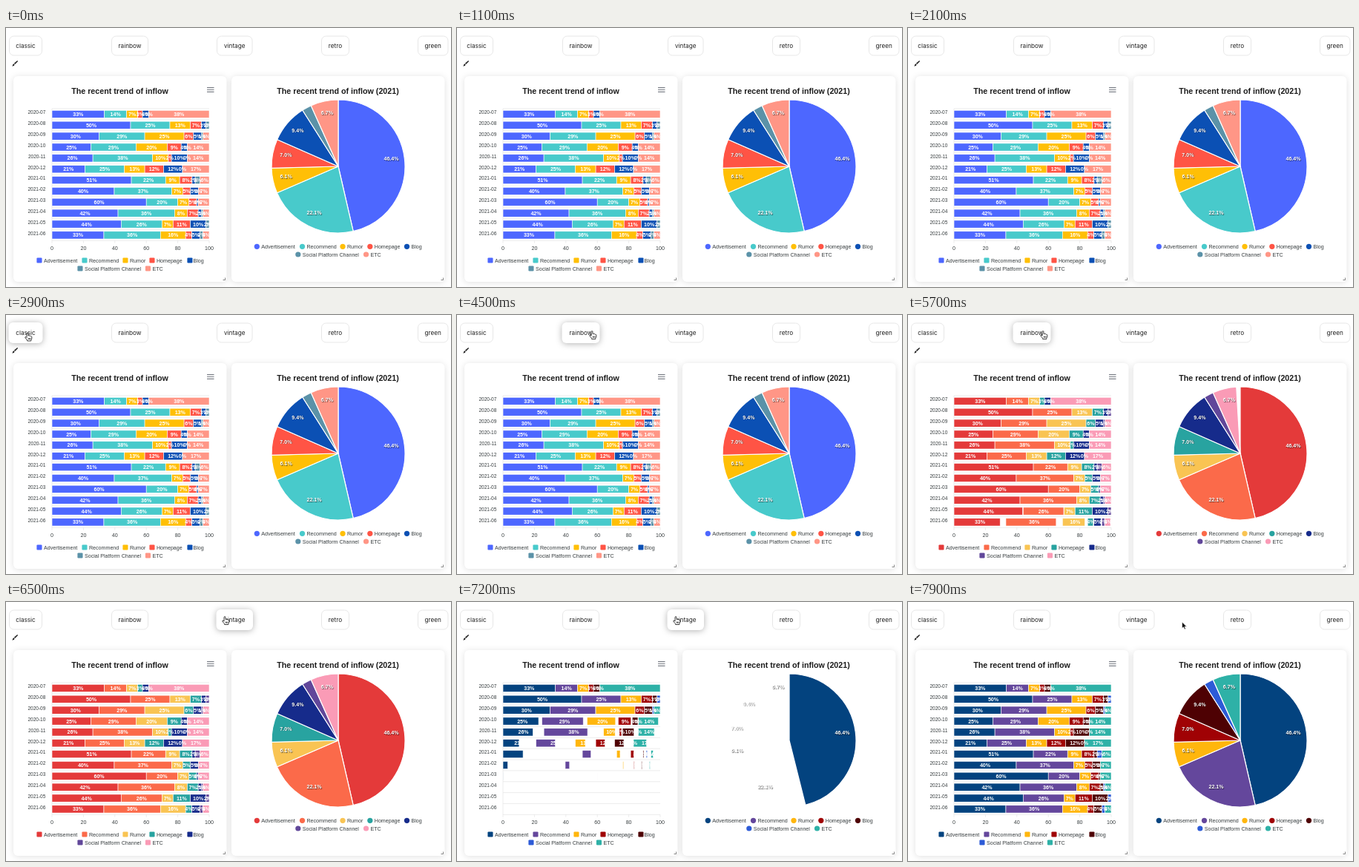
Write an HTML page that moves like this. It is 600 px wide and 350 px high and loops after 8 s.

```html
<!DOCTYPE html>
<html lang="en">
<head>
<meta charset="utf-8">
<title>Chart themes</title>
<style>
html, body { margin: 0; width: 600px; height: 350px; overflow: hidden; background: #fff; }
svg { display: block; font-family: "Liberation Sans", Arial, sans-serif; }
.title { font: bold 10.7px "Liberation Sans", Arial, sans-serif; fill: #1c1c1c; text-anchor: middle; }
.btn { font: 8.2px Inter, sans-serif; fill: #222; text-anchor: middle; }
.tick { font-size: 7.1px; fill: #373d3f; text-anchor: middle; }
.month { font-size: 6.5px; fill: #373d3f; text-anchor: end; }
.legend { font-size: 7.1px; fill: #373d3f; }
.value { font-size: 7.1px; font-weight: bold; fill: #fff; text-anchor: middle; }
.shade { text-shadow: .7px .7px .8px rgba(0, 0, 0, .6); }
.card { fill: #fff; filter: drop-shadow(0 1px 4px rgba(0, 0, 0, .12)); }
.lift { fill: #fff; filter: drop-shadow(0 1px 4px rgba(0, 0, 0, .3)); }
</style>
</head>
<body>
<svg id="stage" width="600" height="350" viewBox="0 0 600 350"></svg>
<script>
const LOOP = 8000;
const themes = [
  ['#4d67ff', '#48cacb', '#ffbf06', '#ff5445', '#0b50b4', '#5b92a8', '#ff9686'],
  ['#e43a3a', '#fb6a4a', '#f9c453', '#28a3a0', '#162b8b', '#61479a', '#fa9bb6'],
  ['#03437f', '#64479c', '#ffb60d', '#a00204', '#4e0103', '#2d5bd7', '#2eb1a7']
];
const names = ['Advertisement', 'Recommend', 'Rumor', 'Homepage', 'Blog', 'Social Platform Channel', 'ETC'];
const shares = [
  [33, 14, 7, 3, 4, 0, 38], [50, 25, 13, 7, 3, 2, 0], [30, 29, 25, 6, 5, 1, 4],
  [25, 29, 20, 9, 4, 0, 14], [26, 38, 10, 2, 10, 0, 14], [21, 25, 13, 12, 12, 0, 17],
  [51, 22, 9, 8, 2, 3, 6], [40, 37, 7, 5, 5, 0, 7], [60, 20, 7, 5, 1, 0, 7],
  [42, 36, 8, 7, 2, 1, 4], [44, 26, 7, 11, 10, 2, 0], [33, 36, 16, 4, 5, 2, 4]
];
const pieShares = [46.4, 22.1, 6.1, 7, 9.4, 2.3, 6.7];

// Theme clicks: bars restart first, the pie a moment later
const clicks = [{ theme: 1, at: 4815 }, { theme: 2, at: 6750 }];
const PIE_LAG = 99, BAR_TIME = 350, BAR_STEP = 55.6, PIE_TIME = 800;

// label, left, right, hover start, hover end
const buttons = [
  ['classic', 4.5, 48.5, 2400, 3835], ['rainbow', 142.5, 191.5, 4015, 5900],
  ['vintage', 284.5, 332, 6096, 7580], ['retro', 425.5, 462.5], ['green', 555.5, 596]
];
// time, x, y of the pointer tip
const path = [[2400, 29, 24], [3750, 29, 24], [4150, 182, 21.5], [5850, 182, 21.5],
  [6150, 295, 19.5], [7350, 295, 19.5], [7800, 369.5, 27]];

const stage = document.getElementById('stage');
function add(tag, attrs, text) {
  const el = document.createElementNS('http://www.w3.org/2000/svg', tag);
  set(el, attrs);
  if (text !== undefined) el.textContent = text;
  return stage.appendChild(el);
}
function set(el, attrs) {
  for (const k in attrs) el.setAttribute(k, attrs[k]);
}
const label = (cls, x, y, text) => add('text', { class: cls, x, y }, text);
const line = (d, stroke, width) => add('path', { d, stroke, 'stroke-width': width, fill: 'none' });
const clamp = v => Math.max(0, Math.min(1, v));
const ease = v => .5 - Math.cos(Math.PI * clamp(v)) / 2;

const lifts = buttons.map(([name, l, r]) => {
  const box = { y: 11, x: l, width: r - l, height: 26, rx: 6 };
  add('rect', { ...box, fill: '#fff', stroke: '#e1e1e1', 'stroke-width': .8 });
  const lift = add('rect', { ...box, class: 'lift', x: l - 1, y: 10, width: r - l + 2, height: 28 });
  label('btn', (l + r) / 2, 27, name);
  return lift;
});
add('path', { d: 'M8.4 51.8L9.2 49.4L10.4 48.3L11.7 49.6L10.7 50.9ZM10.9 47.8L15.2 44.1L16.1 45L12.2 49.1Z', fill: '#222' });

for (const x of [10, 304]) {
  add('rect', { class: 'card', x, y: 65, width: 287.5, height: 278, rx: 6 });
  line(`M${x + 282.5} 340.5h3v-3`, '#777', .9);
}
label('title', 153.5, 88.6, 'The recent trend of inflow');
label('title', 447.5, 88.6, 'The recent trend of inflow (2021)');
line('M271 80.6h9.5M271 83.5h9.5M271 86.4h9.5', '#7c8088', 1.1);

// Bar chart
const X0 = 62, WIDTH = 212, Y0 = 109, ROW = 14.86;
for (let i = 0; i <= 12; i++) line(`M${X0} ${Y0 + i * ROW}h${WIDTH}`, '#e0e0e0', .6);
line(`M${X0} ${Y0}v${12 * ROW}`, '#e0e0e0', .6);
for (let i = 0; i <= 5; i++) {
  const x = X0 + WIDTH * i / 5;
  line(`M${x} ${Y0 + 12 * ROW}v3.5`, '#e0e0e0', .6);
  label('tick', x, 300, i * 20);
}
const bars = [], values = [];
shares.forEach((row, j) => {
  const y = Y0 + j * ROW, total = row.reduce((a, b) => a + b);
  const month = (j + 6) % 12 + 1;
  label('month', 53.3, y + 7.2, `${j < 6 ? 2020 : 2021}-${String(month).padStart(2, '0')}`);
  let x = X0;
  row.forEach((v, s) => {
    const w = v / total * WIDTH;
    const el = add('rect', { x, y: y + 2.3, height: 10.3, stroke: '#fff', 'stroke-width': .6 });
    bars.push({ el, w, j, s });
    values.push([x + w / 2, y + 10, v + '%']);
    x += w;
  });
});
values.forEach(v => label('value', ...v));

// Pie chart
const CX = 448, CY = 187, R = 90;
const polar = (p, r) => {
  const a = p / 100 * 2 * Math.PI;
  return [CX + r * Math.sin(a), CY - r * Math.cos(a)];
};
let sum = 0;
const slices = pieShares.map(v => {
  const el = add('path', { stroke: '#fff', 'stroke-width': 1.2 });
  const from = sum;
  sum += v;
  return { el, from, v };
});
slices.forEach(({ from, v }) => {
  if (v < 3) return;
  const [x, y] = polar(from + v / 2, R * .8);
  label('value shade', x, y + .6, v.toFixed(1) + '%');
});

// Legends
const barKeys = [45, 106, 161, 197, 248, 100, 191.5].map((x, s) => {
  const y = s < 5 ? 314 : 325;
  label('legend', x + (s === 4 ? 4.5 : 6), y + 2.6, names[s]);
  return add('rect', { x: x - 3.6, y: y - 3.6, width: 7.1, height: 7.1, rx: 1.2 });
});
const pieKeys = [338.3, 399.5, 454, 490.8, 540.5, 393.8, 485.5].map((x, s) => {
  const y = s < 5 ? 295.3 : 306;
  label('legend', x + 6, y + 2.6, names[s]);
  return add('circle', { cx: x, cy: y, r: 3.6 });
});

// Pointer
const arrow = add('path', {
  d: 'M0 0V8.6L2 6.8L3.4 10L4.9 9.3L3.5 6.3H6.2Z',
  fill: '#111', stroke: '#fff', 'stroke-width': .6
});
const hand = add('path', {
  d: 'M-1 .8Q0-.6 1 .8V4Q2 3.2 2.8 4.2Q3.8 3.6 4.4 4.8Q5.6 4.4 5.8 5.8V7.6Q5.6 9 4.8 9.8V11H-.4V10L-3.2 6.6Q-3.4 5.2-2 5.6L-1 6.6ZM1.2 7.2V9.2M2.6 7.2V9.2M4 7.2V9.2',
  fill: '#fff', stroke: '#111', 'stroke-width': .8, 'stroke-linejoin': 'round'
});

function current(t) {
  return clicks.filter(c => t >= c.at).pop() || { theme: 0, at: -LOOP };
}

function drawBars(t) {
  const { theme, at } = current(t);
  bars.forEach(({ el, w, j, s }) => {
    const width = w * ease((t - at - j * BAR_STEP) / BAR_TIME);
    set(el, { width, fill: themes[theme][s], visibility: width > 0 ? 'visible' : 'hidden' });
  });
  barKeys.forEach((el, s) => set(el, { fill: themes[theme][s] }));
}

function drawPie(t) {
  const { theme, at } = current(t);
  slices.forEach(({ el, from, v }, s) => {
    const part = v * ease(((t - at) / PIE_TIME * 100 - from) / v);
    const d = part > 0
      ? `M${CX} ${CY}L${polar(from, R)}A${R} ${R} 0 ${part > 50 ? 1 : 0} 1 ${polar(from + part, R)}Z`
      : '';
    set(el, { d, fill: themes[theme][s] });
  });
  pieKeys.forEach((el, s) => set(el, { fill: themes[theme][s] }));
}

function drawPointer(t) {
  let over = false;
  buttons.forEach(([, , , start = LOOP, end = LOOP], i) => {
    over = over || (t >= start && t < end);
    set(lifts[i], { opacity: clamp((t - start) / 150) * clamp((end + 150 - t) / 150) });
  });
  let i = 0;
  while (i < path.length - 2 && t >= path[i + 1][0]) i++;
  const [t0, x0, y0] = path[i], [t1, x1, y1] = path[i + 1];
  const p = ease((t - t0) / (t1 - t0));
  const transform = `translate(${x0 + (x1 - x0) * p} ${y0 + (y1 - y0) * p})`;
  const shown = t >= path[0][0];
  set(hand, { transform, visibility: shown && over ? 'visible' : 'hidden' });
  set(arrow, { transform, visibility: shown && !over ? 'visible' : 'hidden' });
}

function frame() {
  const t = performance.now() % LOOP;
  drawBars(t);
  drawPie(t - PIE_LAG);
  drawPointer(t);
  requestAnimationFrame(frame);
}
frame();
</script>
</body>
</html>
```
